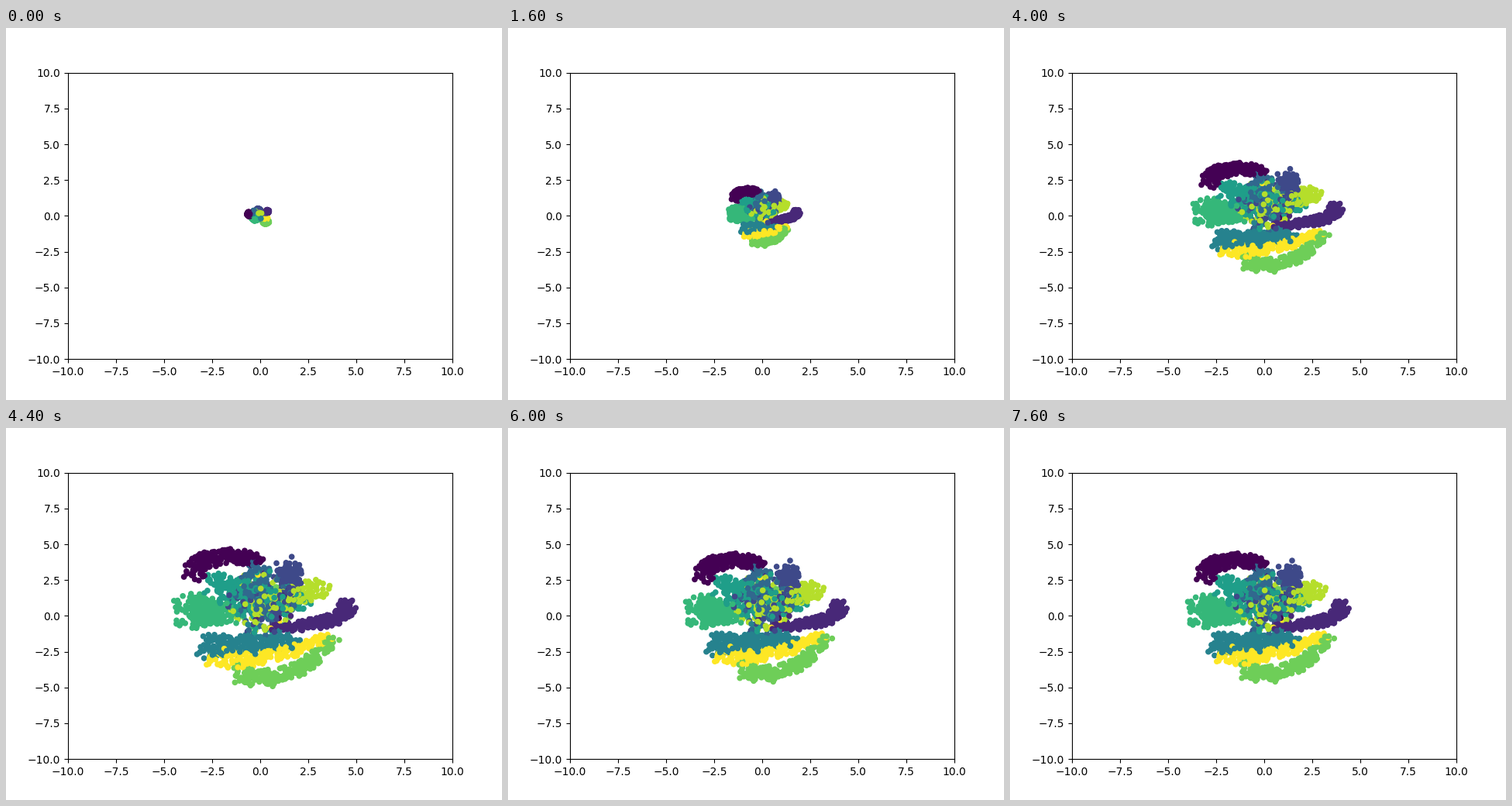
A matplotlib script that plays this animation: 640x480 px, repeating every 8 s.

```python
import matplotlib.pyplot as plt
import numpy as np
from matplotlib.animation import FuncAnimation

FRAMES, INTERVAL = 20, 400
PER_CLASS = 230
CORE, CORE_RADIUS = np.array([.1, .85]), 1.6
ROUND = np.array([1, 1.33])  # a round spread on screen

# Each class is a tapering ribbon through three points:
# start, middle, end, radius, where it gathers at first, share of strays
RIBBONS = [
    ((-3.1, 2.85), (-1.9, 3.85), (0, 3.55), .56, .1, .03),
    ((4.0, .8), (3.2, -.25), (.5, -.75), .42, .35, .04),
    ((1.2, 3.2), (1.35, 2), (.7, .2), .62, .3, .2),
    ((0, 3.1), (-.3, 1.8), (.3, .2), .65, .2, .25),
    ((-2.4, -2.0), (-.6, -1.9), (1.5, -1.6), .68, .8, .05),
    ((-2.1, 1.8), (-.8, 1.6), (2.0, .8), .8, .4, .25),
    ((-3.2, .3), (-2.6, .3), (-1.6, .1), .97, .7, .04),
    ((-1.1, -3.75), (1.2, -3.8), (3.4, -1.5), .52, .0, .02),
    ((2.7, 1.7), (1.2, 1.3), (-.5, .2), .6, .6, .25),
    ((-2.2, -2.7), (.3, -2.65), (3.2, -1.4), .52, .5, .04),
]

rng = np.random.default_rng(4)
label = rng.permutation(np.repeat(np.arange(len(RIBBONS)), PER_CLASS))
first, middle, last, radius, gather, share = (
    np.array(column)[label] for column in zip(*RIBBONS))


def disc(n):
    angle, r = rng.random(n) * 2 * np.pi, np.sqrt(rng.random(n))
    return np.column_stack([np.cos(angle), np.sin(angle)]) * r[:, None] * ROUND


along = rng.random(label.size)
offset, core_offset = disc(label.size), disc(label.size)
is_stray = rng.random(label.size) < share


def layout(length=1, puff=1):
    """Place all dots; a short length gathers each ribbon into a clump."""
    t = gather + (along - gather) * length
    curve = ((1 - t) * (1 - 2 * t) * first.T + 4 * t * (1 - t) * middle.T
             + t * (2 * t - 1) * last.T).T
    width = radius * (1 - .45 * t) * puff
    pos = curve + offset * width[:, None]
    pos[is_stray] = (CORE + core_offset * CORE_RADIUS)[is_stray]
    return pos


def rotated(pos, degrees):
    a = np.radians(degrees)
    return pos @ np.array([[np.cos(a), np.sin(a)], [-np.sin(a), np.cos(a)]])


final = layout()
compact = final * .46
clumps = layout(length=.3, puff=1.3) * .43
seed = rotated(clumps, 40) * .32


def positions(i):
    if i < 3:
        return seed + (clumps - seed) * np.sin(i * np.pi / 4)
    if i < 10:
        return clumps + (compact - clumps) * (1 - .5 ** (i - 2))
    # Sudden swelling with a short overshoot.
    keys = 10, 11, 12, 13
    return final * [np.interp(i, keys, (.93, 1.13, 1.05, 1)),
                    np.interp(i, keys, (.85, 1.07, 1.04, 1))]


fig, ax = plt.subplots(figsize=(6.4, 4.8), dpi=100)
ax.set(xlim=(-10, 10), ylim=(-10, 10))
dots = ax.scatter(*positions(0).T, c=label, s=20, cmap="viridis")


def update(i):
    dots.set_offsets(positions(i))
    return dots,


anim = FuncAnimation(fig, update, frames=FRAMES, interval=INTERVAL,
                     repeat=True, repeat_delay=0)
plt.show()
```
